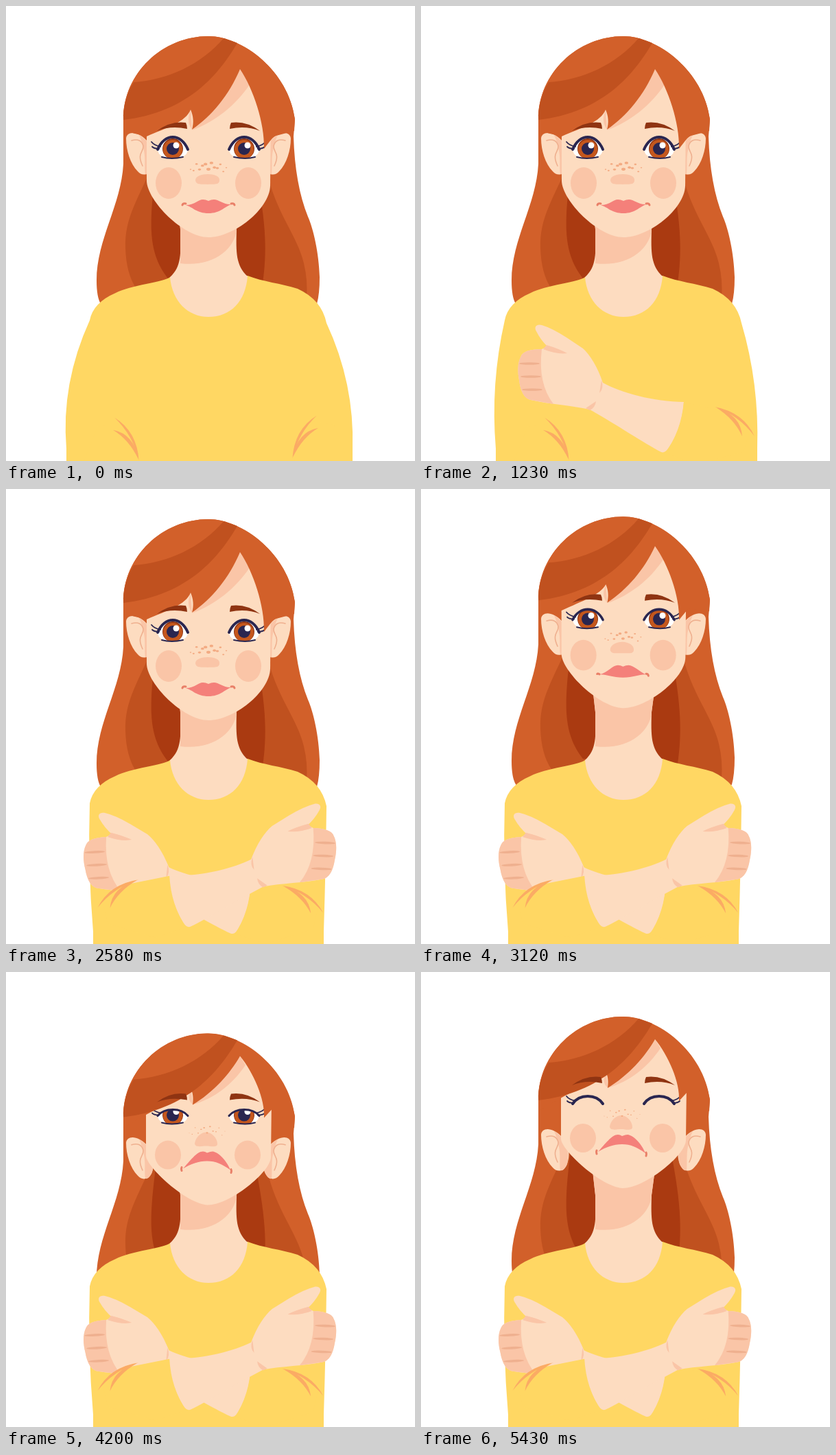
Recreate the animation shown at these times as an HTML page with a canvas. Size 596 px wide and 663 px high, loop 6300 ms.

```html
<!DOCTYPE html>
<html lang="en">
<head>
<meta charset="utf-8">
<title>Crossed arms</title>
<style>
html, body { margin: 0; width: 100%; height: 100%; overflow: hidden; background: #fff; }
canvas { display: block; }
</style>
</head>
<body>
<canvas id="stage" width="596" height="663"></canvas>
<script>
const ctx = document.getElementById('stage').getContext('2d');
const LOOP = 6300, STEP = 30, LAST = 5430;
const HAIR = '#d2602a', HAIR_MID = '#c0511f', HAIR_DARK = '#aa3a11', SKIN = '#fddcc0', SHADE = '#fac5a7',
  CREASE = '#efb08f', SHIRT = '#ffd763', FOLD = '#fbab64', NAVY = '#2a2650', BROW = '#8f3412',
  IRIS = '#c4571d', LIPS = '#f4807a', FRECKLE = '#f3ab83';

// Progress 0..1 between two times, eased at both ends.
function ease(t, from, to) {
  const u = Math.min(1, Math.max(0, (t - from) / (to - from)));
  return u * u * (3 - 2 * u);
}

// Rises to 1 and falls back to 0 between two times.
const bump = (t, from, to) => Math.sin(Math.PI * ease(t, from, to));

// Blends two paths with the same commands.
function mix(a, b, k) {
  const target = b.match(/-?\d+/g);
  let i = 0;
  return a.replace(/-?\d+/g, n => +n + (target[i++] - n) * k);
}

function fill(path, color) {
  ctx.fillStyle = color;
  ctx.fill(new Path2D(path));
}

function stroke(path, color, width) {
  ctx.strokeStyle = color;
  ctx.lineWidth = width;
  ctx.lineCap = 'round';
  ctx.stroke(new Path2D(path));
}

function oval(x, y, rx, ry, color) {
  ctx.fillStyle = color;
  ctx.beginPath();
  ctx.ellipse(x, y, rx, ry, 0, 0, 7);
  ctx.fill();
}

function at(x, y, draw, flip = 1) {
  ctx.save();
  ctx.translate(x, y);
  ctx.scale(flip, 1);
  draw();
  ctx.restore();
}

function bothSides(draw) {
  draw();
  at(590, 0, draw, -1);
}

function backHair() {
  fill('M171 165L171 230C168 290 132 340 132 400Q132 424 138 434L150 460H440L453 434Q457 420 457 395C456 360 448 325 440 307Q421 260 419 190L421 165C412 95 345 44 295 44C228 44 171 98 171 165Z', HAIR);
  fill('M215 230C190 285 173 310 174 352Q175 390 190 412H250V230Z', HAIR_MID);
  fill('M380 240C392 300 425 335 434 375Q440 400 438 425H340V240Z', HAIR_MID);
  fill('M218 240C208 320 207 360 236 397H260V240Z', HAIR_DARK);
  fill('M364 240C380 320 380 360 374 404H330V240Z', HAIR_DARK);
}

function torso(left, right) {
  fill(`M239 395C232 402 180 407 160 418Q127 432 122 458Q${left - 8} 550 ${left} 645V663
    H${right}V645Q${right + 3} 550 467 462Q460 428 425 412C400 404 375 402 352 393Z`, SHIRT);
}

function neck() {
  fill('M249 280L254 325C255 360 256 380 239 395C242 430 265 453 295 453C328 453 349 430 352 394C335 378 335 360 336 325L342 280Z', SKIN);
  fill('M249 280L254 325V375C300 381 334 355 336 325L342 280Z', SHADE);
}

// Forearm, hand and sleeve, pivoting at the elbow.
function arm(x, y, degrees) {
  ctx.save();
  ctx.translate(x, y);
  ctx.rotate(degrees * Math.PI / 180);
  ctx.translate(-460, -640);
  fill('M383 577C340 577 290 563 265 549C257 525 246 508 236 499L212 483Q190 469 176 465C169 463 164 467 168 474Q174 486 184 496L176 500Q150 500 146 510C140 520 141 535 143 545Q146 571 160 574C185 580 220 582 246 588C285 610 325 637 350 650Q355 652 360 645Q380 617 383 577Z', SKIN);
  fill('M176 500Q150 500 146 510C140 520 141 535 143 545Q146 571 160 574L193 580Q170 550 176 500Z', SHADE);
  for (let i = 0; i < 3; i++) oval(158 + 2 * i, 521 + 19 * i, 15, 1.8, CREASE);
  fill('M183 494Q200 499 213 506Q198 508 178 500Z', SHADE);
  fill('M263 545Q267 557 260 564ZM255 576Q254 585 246 589L240 586Z', SHADE);
  fill('M383 577L455 594L480 615L470 650L400 668L356 651Q379 620 383 577Z', SHIRT);
  fill('M428 584Q470 592 486 627Q464 597 428 584ZM430 585Q466 596 468 627Q457 602 430 585Z', FOLD);
  ctx.restore();
}

// One arm reaches across, the other folds over it, then both settle.
function body(t) {
  const reach = ease(t, 0, 1230), cross = ease(t, 1230, 1830), settle = ease(t, 1830, 2580);
  const flare = bump(t, 200, 1230);
  torso(88 + 21 * reach + 18 * cross, 505 - 15 * reach - 27 * cross + 45 * flare);
  neck();
  arm(469 - 9 * reach - 25 * cross + 2 * settle + 36 * flare,
    621 + 19 * reach + 4 * cross - 12 * settle,
    97 * (reach - 1) + 14 * cross - 17 * settle);
  at(596, 0, () => arm(454 - 22 * reach + 5 * cross, 624, 90 * cross - 97 + 5 * settle), -1);
}

function ear() {
  fill('M175 193C176 182 192 182 205 196C215 205 219 222 212 238C207 247 198 248 192 241C181 230 175 210 175 193Z', SKIN);
  fill('M194 188C205 194 219 210 213 236Q208 247 203 245C201 230 206 215 194 188Z', SHADE);
  stroke('M183 196Q197 192 200 204C201 213 190 214 199 233', CREASE, 1.6);
}

function eye(side, droop, shut) {
  const corner = 1 + 7 * shut;
  const apex = -17 + 9 * droop + 5 * shut;
  const bottom = 14 - droop - 16 * shut;
  const arch = (4 * apex - corner) / 3;
  const lid = `M-22 ${corner}C-12 ${arch} 12 ${arch} 22 ${corner}`;
  if (bottom > corner) {
    ctx.save();
    ctx.clip(new Path2D(`${lid}Q21 ${bottom} 0 ${bottom}Q-21 ${bottom} -22 ${corner}Z`));
    oval(0, 0, 30, 30, '#fff');
    oval(0, 0, 15, 15, BROW);
    oval(0, 1, 14, 14, IRIS);
    oval(0, 0, 9, 9, NAVY);
    oval(5 * side, -5, 4.5, 4.5, '#fff');
    ctx.restore();
    stroke(`M-15 ${bottom - 2}Q2 ${bottom + 2} 16 ${bottom - 2}`, NAVY, 2);
  }
  stroke(lid, NAVY, 4 - droop + shut);
  at(0, corner, () => stroke('M18 -4Q27 -6 31 -11M20 -1Q27 -1 30 -4', NAVY, 1.8));
}

function freckles(p) {
  for (let i = 0; i < 13; i++) {
    const spread = i / 6 - 1;
    const x = 295 + 26 * spread, y = 233 + 5 * spread * spread + 5 * Math.sin(2.4 * i);
    const r = 3 - 1.8 * Math.abs(spread);
    oval(x - 2 * p, y - 49 * p, r * (1 - 0.5 * p), r * (0.7 - 0.35 * p), FRECKLE);
  }
}

function face(p, shut) {
  fill(mix('M205 150L205 255C206 284 258 337 295 337C332 337 384 296 385 262L386 150L341 80Z',
    'M204 140L204 222C204 238 262 292 294 294C326 294 386 246 386 224L387 140L341 65Z', p), SKIN);
  fill(mix('M341 92L356 113C335 145 305 168 271 181Z', 'M341 77L349 90C330 118 305 138 272 148Z', p), SHADE);
  fill(mix('M269 151C265 162 264 170 271 180Z', 'M270 126C265 134 265 141 272 148Z', p), SHADE);

  for (const x of [237, 353]) oval(x - p, 258 - 37 * p, 19, 23 - 2 * p, SHADE);
  fill(mix('M276 254C276 248 285 245 294 245C303 245 312 248 311 254C311 262 300 259 294 260C288 259 277 262 276 254Z',
    'M275 204C277 194 285 188 292 188C300 188 308 197 308 205C308 211 298 208 292 208C286 208 275 211 275 204Z', p), SHADE);
  freckles(p);

  fill(mix('M262 290C275 290 280 282 287 282Q291 282 295 284Q299 282 303 282C310 282 318 290 328 289C318 293 312 302 295 302C278 302 272 293 262 290Z',
    'M258 241C268 230 278 216 287 216Q290 216 293 218Q298 216 301 216C310 217 322 230 327 243C314 234 306 230 293 230C280 230 270 234 258 241Z', p), LIPS);
  stroke(mix('M257 290Q258 287 262 288M328 288Q332 287 333 290', 'M256 239Q255 241 256 244M328 242Q329 244 328 247', p), '#e98068', 3);

  for (const side of [-1, 1]) at(295 + 52 * side, 208 - 45 * p, () => eye(side, p, shut), side);
}

function frontHair(p) {
  fill(mix('M171 165C171 98 228 44 295 44C345 44 412 95 421 165L420 182L390 190L376 208C377 170 360 120 341 92C325 130 300 160 271 180C274 170 273 160 269 151C262 169 235 177 205 190L171 182Z',
    'M171 165C171 98 228 44 293 44C343 44 410 95 421 165L420 182L388 154L376 167C378 140 360 100 341 77C327 102 302 130 272 148C273 140 273 133 270 126C260 136 235 146 205 162L171 182Z', p), HAIR);
  fill('M186 111C235 108 285 85 317 47L337 54C310 100 265 155 171 166Q171 135 186 111Z', HAIR_MID);
}

const brow = () => fill('M220 182Q240 167 262 170Q264 174 264 179Q240 174 220 182Z', BROW);

function draw(t) {
  const lift = 46 * ease(t, 3230, 4260) - 25 * ease(t, 4260, LAST) - 6 * bump(t, 2640, 3330);
  const earDrop = 23 * ease(t, 3550, 4950);
  const pitch = ease(t, 2640, 3900);
  const shut = ease(t, 4300, 5100);
  ctx.fillStyle = '#fff';
  ctx.fillRect(0, 0, 596, 663);
  at(0, lift, backHair);
  body(t);
  at(0, lift + earDrop, () => bothSides(ear));
  at(0, lift, () => {
    face(pitch, shut);
    frontHair(pitch);
  });
  at(0, lift - 38 * pitch, () => bothSides(brow));
}

function frame() {
  const t = performance.now() % LOOP;
  draw(Math.min(LAST, Math.floor(t / STEP) * STEP));
  requestAnimationFrame(frame);
}
frame();
</script>
</body>
</html>
```
